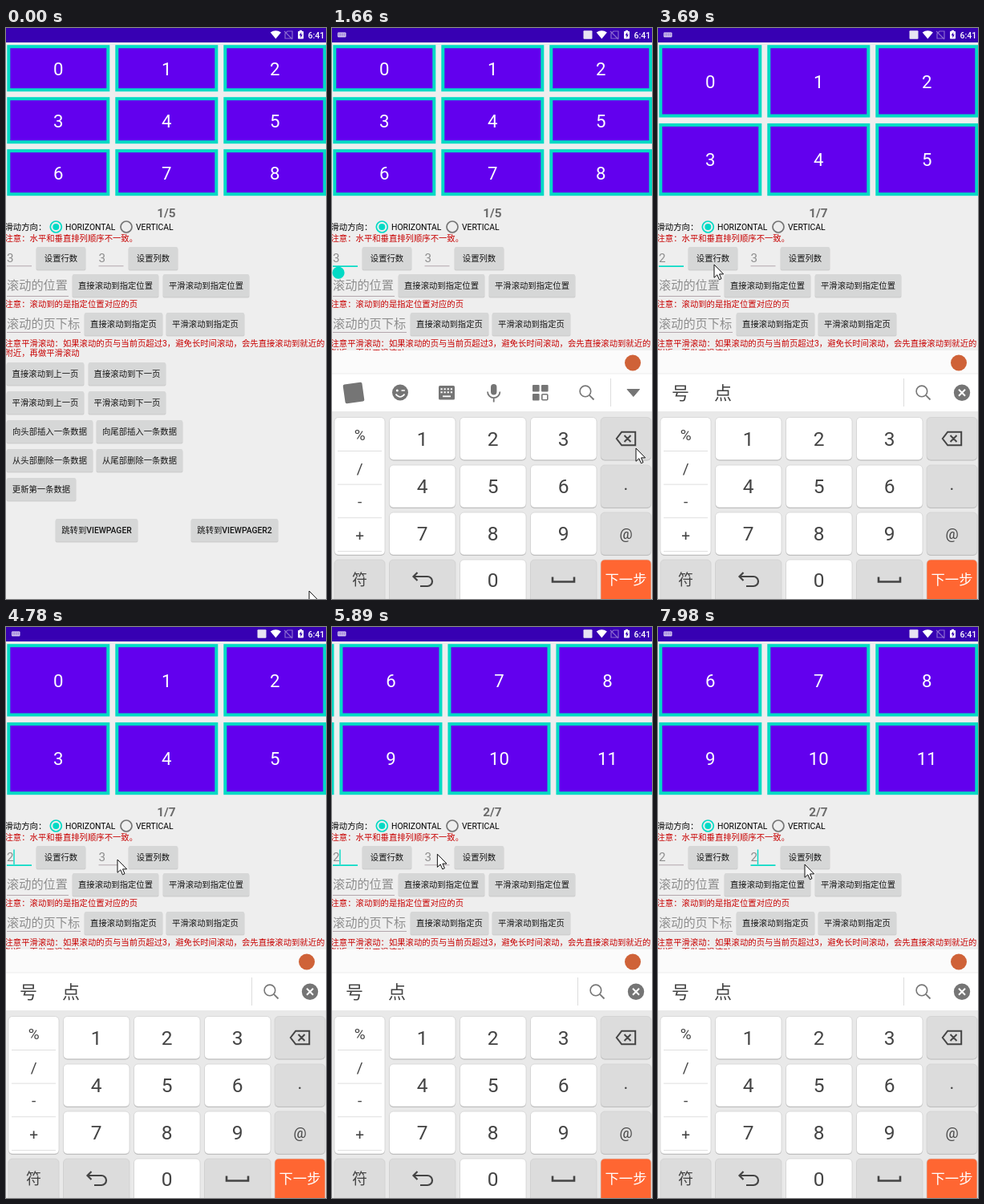
An HTML page that plays this animation: 399 by 712 pixels, repeating every 8000 ms.

```html
<!DOCTYPE html>
<html lang="zh-CN">
<head>
<meta charset="utf-8">
<title>Pager grid demo</title>
<style>
html, body { margin: 0; width: 100%; height: 100%; overflow: hidden; background: #eee; }
svg { display: block; width: 399px; height: 712px; }
text { font-family: Roboto, "Noto Sans CJK SC", "Noto Sans CJK", sans-serif; white-space: pre; }
</style>
</head>
<body>
<svg id="stage" viewBox="0 0 399 712" xmlns="http://www.w3.org/2000/svg"></svg>
<script>
const LOOP = 8000, TEAL = '#03dac5', GREY = '#757575', RED = '#c80000', HINT = '#8e8e8e';

// ---- markup helpers ----
const text = (s, x, y, size, fill = '#000', extra = '') =>
  `<text x="${x}" y="${y}" font-size="${size}" fill="${fill}" ${extra}>${s}</text>`;
const mid = (s, x, y, size, fill, extra = '') =>
  text(s, x, y, size, fill, `text-anchor="middle" ${extra}`);
const rect = (x, y, w, h, fill, r = 0, extra = '') =>
  `<rect x="${x}" y="${y}" width="${w}" height="${h}" rx="${r}" fill="${fill}" ${extra}/>`;
const circle = (x, y, r, fill, extra = '') =>
  `<circle cx="${x}" cy="${y}" r="${r}" fill="${fill}" ${extra}/>`;
const path = (d, fill, extra = '') => `<path d="${d}" fill="${fill}" ${extra}/>`;
const line = (d, stroke, w, extra = '') =>
  path(d, 'none', `stroke="${stroke}" stroke-width="${w}" ${extra}`);
const group = (id, body, extra = '') => `<g id="${id}" ${extra}>${body}</g>`;

// ---- app page ----
const button = (s, x, y, w, id = '') =>
  rect(x - .5, y + 1, w + 1, 28.6, '#000', 2, 'opacity=".13"') +
  rect(x, y, w, 28, '#d6d7d7', 1.5, id && `id="${id}"`) +
  mid(s, x + w / 2, y + 17.7, 10.35, '#151515', 'font-weight="500"');

const buttons = [
  ['设置行数', 38, 273, 61, 'setRows'], ['设置列数', 153, 273, 61],
  ['直接滚动到指定位置', 83, 307, 107], ['平滑滚动到指定位置', 196, 307, 107],
  ['直接滚动到指定页', 98, 355, 97], ['平滑滚动到指定页', 200, 355, 97],
  ['直接滚动到上一页', 1, 417, 96], ['直接滚动到下一页', 103, 417, 96],
  ['平滑滚动到上一页', 1, 453, 96], ['平滑滚动到下一页', 103, 453, 96],
  ['向头部插入一条数据', 1, 489, 107], ['向尾部插入一条数据', 113, 489, 107],
  ['从头部删除一条数据', 1, 525, 107], ['从尾部删除一条数据', 113, 525, 107],
  ['更新第一条数据', 1, 561, 86],
  ['跳转到VIEWPAGER', 62, 612, 102], ['跳转到VIEWPAGER2', 231, 612, 108]
];

const tiles = (rows, count) => {
  const h = rows === 3 ? 58 : 90.3, pitch = rows === 3 ? 65 : 97.7, per = rows * 3;
  let out = '';
  for (let i = 0; i < count; i++) {
    const n = i % per, x = 1.3 + 135 * (n % 3) + 405 * Math.floor(i / per);
    const y = 21.2 + pitch * Math.floor(n / 3);
    out += rect(x + 2, y + 2, 124, h - 4, '#6200ee', 0, `stroke="${TEAL}" stroke-width="4"`) +
      mid(i, x + 64, y + h / 2 + 8.4, 22.2, '#fff');
  }
  return out;
};

const field = (id, x) =>
  group(id + 'Text', text('3', x, 292, 15.2, HINT)) +
  rect(x, 296.3, 31, 1, '#b3a6ad', 0, `id="${id}Line"`) +
  rect(x + 8.6, 277.5, 1.4, 18.5, TEAL, 0, `id="${id}Caret"`) +
  path(`M${x + 7} 296.5l5.3 3.3a7.6 7.6 0 1 1-10.6 0z`, TEAL, `id="${id}Handle"`);

const page =
  group('grid3', tiles(3, 9)) + group('grid2', tiles(2, 12)) +
  group('label', mid('', 200, 236.3, 15.4, '#6b6b6b', 'font-weight="700"')) +
  text('滑动方向：', -1.5, 252, 10.35) +
  circle(62.3, 248, 7, 'none', `stroke="${TEAL}" stroke-width="1.7"`) + circle(62.3, 248, 4, TEAL) +
  text('HORIZONTAL', 74, 252, 10.4) +
  circle(150, 248, 7, 'none', `stroke="${GREY}" stroke-width="1.7"`) +
  text('VERTICAL', 162, 252, 10.4) +
  text('注意：水平和垂直排列顺序不一致。', -1.5, 266, 10.35, RED) +
  text('注意：滚动到的是指定位置对应的页', -1.5, 348.3, 10.35, RED) +
  text('注意平滑滚动：如果滚动的页与当前页超过3，避免长时间滚动，会先直接滚动到就近的', -1.5, 397, 10.35, RED) +
  text('附近，再做平滑滚动', -1.5, 409.3, 10.35, RED) +
  text('滚动的位置', 1, 326, 15.2, HINT) + rect(1, 334, 77, 1, '#b3a6ad') +
  text('滚动的页下标', 1, 374.2, 15.2, HINT) + rect(1, 379, 92, 1, '#b3a6ad') +
  buttons.map(b => button(...b)).join('') +
  field('row', 1) + field('col', 115.5);

const statusBar = rect(0, 0, 399, 18, '#3700b3') +
  path('M336.3 13.5L329.7 5.6Q336.3 .8 342.9 5.6z', '#fff') +
  line('M348 13V7l3-3h6v9zM347 4l10 10', '#8b6bd0', 1.2) +
  rect(364, 4, 7, 9.6, '#fff', .8) + rect(366, 2.8, 3, 2, '#fff') +
  path('M368.2 5.2l-2.6 4h1.7v3.2l2.5-4.2h-1.6z', '#3700b3') +
  text('6:41', 376.6, 12.8, 10.5, '#fff', 'font-weight="500"') +
  group('imeIcons',
    rect(7, 5.4, 10.5, 6.2, '#d9cdf2', 1) +
    line('M8 7.4h8.5M8 9.2h8.5', '#3700b3', .8, 'stroke-dasharray="1 .8"') +
    rect(313.5, 3.2, 11, 10.6, '#e8e4f2', 1));

// ---- keyboard ----
const key = (x, y, w, h, fill, id = '') =>
  rect(x, y + 1, w, h, '#b5b5b5', 5) +
  rect(x, y, w, h, fill, 5, `stroke="#cfcfcf" stroke-width=".7" ${id && `id="${id}"`}`);
const INK = '#444', MUTE = '#dcdcdc';
const rowsY = [485.5, 545, 604], colsX = [71.5, 159.5, 247.5];
const search = (x, y) => circle(x - 1.6, y - 1.6, 6.8, 'none', 'stroke="#777" stroke-width="1.6"') +
  line(`M${x + 3.4} ${y + 3.4}l5.6 5.6`, '#777', 1.8);

const toolbar =
  rect(15, 443, 24, 24, GREY, 2, 'transform="rotate(-8 27 455)"') +
  circle(85, 454.5, 10, GREY) + circle(81.3, 452, 1.5, '#fff') +
  line('M86.5 452h4.4M79.5 456.5q5.5 7 11 0', '#fff', 1.7) +
  rect(133, 446, 20, 17.5, GREY, 1.5) +
  line('M135.5 450.2h15M135.5 454.3h15', '#fff', 2, 'stroke-dasharray="2.2 1.9"') +
  line('M138 459.3h10', '#fff', 1.8) +
  rect(198, 444, 7.4, 13.5, GREY, 3.7) +
  line('M194 453.5a7.7 7.7 0 0 0 15.4 0M201.7 461.5v5', GREY, 1.8) +
  rect(250, 445, 8.6, 8.6, GREY, 1) + rect(250, 456, 8.6, 8.6, GREY, 1) + rect(261, 445, 8.6, 8.6, GREY, 1) +
  rect(261.8, 456.8, 7, 7, 'none', 1, `stroke="${GREY}" stroke-width="1.6"`) +
  search(317.5, 454.5) + rect(347, 437, 1, 35, '#ddd') +
  path('M368 450.5h15.5l-7.7 9z', GREY, `stroke="${GREY}" stroke-linejoin="round"`);

const candidates = text('号', 17, 463, 22, INK) + text('点', 70, 463, 22, INK) +
  rect(306, 437, 1, 35, '#ddd') + search(330.5, 454.5) + circle(379, 454.7, 10.2, GREY) +
  line('M375 450.7l8 8m0-8l-8 8', '#fff', 2);

let keyboard = rect(0, 402, 399, 310, '#e9e9e9') + rect(0, 402, 399, 29, '#fbfbfb') +
  rect(0, 431, 399, 47, '#fff') + rect(0, 430.6, 399, .8, '#e9e9e9') +
  circle(375, 417.5, 10, '#cf6238') + group('tools', toolbar) + group('cands', candidates) +
  key(3, 485.5, 63, 171.5, '#fff');
['%', '/', '-', '+'].forEach((s, i) => {
  keyboard += mid(s, 34.7, 514 + 41.5 * i, 19, INK) + rect(7, 527 + 41.7 * i, 55, .8, '#d8d8d8');
});
rowsY.forEach((y, r) => colsX.forEach((x, c) => {
  const n = r * 3 + c + 1;
  keyboard += key(x, y, 82.5, 53, '#fff', 'key' + n) + mid(n, x + 41.2, y + 35.4, 24.5, INK);
}));
rowsY.forEach((y, i) => { keyboard += key(335, y, 63, 53, MUTE, 'side' + i); });
keyboard +=
  line('M354.8 512l6.4-8.3h17v16.6h-17zM364.5 508l8 8m0-8l-8 8', INK, 2) +
  mid('.', 366.5, 576, 22, INK) + mid('@', 366.5, 637, 18, INK) +
  key(3, 663, 63, 55, MUTE) + mid('符', 34.5, 694.5, 19, INK) +
  key(71.5, 663, 82.5, 55, MUTE) + line('M106.5 679l-5 5 5 5M102 684h17a6 6 0 0 1 0 12h-9', INK, 2.2) +
  key(159.5, 663, 82.5, 55, '#fff') + mid('0', 200.7, 696.7, 24.5, INK) +
  key(247.5, 663, 82.5, 55, MUTE) + line('M275 684.5v6h27v-6', INK, 2.6) +
  key(335, 663, 63, 55, '#ff6632') + mid('下一步', 366.5, 694, 17.3, '#fff');

const arrow = path('M0 0V16.3L3.8 12.8 6.4 18.8 9 17.6 6.5 11.9H11.6z', '#fff',
  'id="cursor" stroke="#111" stroke-width="1" stroke-linejoin="round"');

stage.innerHTML = rect(0, 0, 399, 712, '#eee') + page + group('ime', keyboard) + statusBar + arrow;

// ---- motion: [time, value...] steps, eased between ----
const cursorSteps = [
  [0, 378, 702], [40, 378, 702], [480, 120, 360], [700, 14, 268], [810, 9, 284], [1180, 9, 284],
  [1500, 340, 480], [1660, 379, 524], [1950, 379, 524], [2420, 196, 514], [2510, 194, 516], [2880, 194, 516],
  [3250, 72, 294], [3320, 70, 295], [4130, 70, 295], [4500, 128, 288], [4780, 139, 290], [4950, 139, 290],
  [5220, 285, 160], [5250, 285, 160], [5450, 125, 165], [5480, 125, 167], [5640, 156, 260], [5760, 142, 280],
  [6010, 122, 286], [6300, 122, 286], [6640, 340, 460], [6820, 358, 500], [7060, 358, 502],
  [7320, 196, 516], [7600, 196, 518], [7900, 188, 306], [7980, 183, 296], [8000, 183, 296]
];
const scrollSteps = [[0, 0], [5250, 0], [5460, 160], [5640, 307], [5760, 368], [5860, 394], [5980, 405], [8000, 405]];
const imeSteps = [[0, 310], [1020, 310], [1120, 70], [1200, 0], [8000, 0]];

function sample(steps, t, ease = k => k) {
  let i = 1;
  while (i < steps.length - 1 && steps[i][0] <= t) i++;
  const a = steps[i - 1], b = steps[i];
  const k = ease(Math.min(1, Math.max(0, (t - a[0]) / (b[0] - a[0]))));
  return a.slice(1).map((v, n) => v + (b[n + 1] - v) * k);
}
const soft = k => .4 * k + .6 * k * k * (3 - 2 * k);

const el = id => document.getElementById(id);
const show = (id, on) => el(id).style.display = on ? '' : 'none';
const within = (t, a, b) => t >= a && t < b;
const blink = (t, from) => (t - from) % 1000 < 500;

function setField(id, x, value, hint, focus, caret, handle) {
  const node = el(id + 'Text').firstChild, label = value || hint;
  if (node.textContent !== label) node.textContent = label;
  const bar = el(id + 'Line');
  bar.setAttribute('fill', focus ? TEAL : '#b3a6ad');
  bar.setAttribute('height', focus ? 1.7 : 1);
  el(id + 'Caret').setAttribute('x', x + (value ? 8.3 : 0));
  show(id + 'Caret', focus && caret);
  show(id + 'Handle', handle);
}

function render(t) {
  const two = t >= 3480, first = within(t, 900, 6200), second = t >= 6200;
  show('grid3', !two);
  show('grid2', two);
  el('grid2').setAttribute('transform', `translate(${-sample(scrollSteps, t)[0]} 0)`);
  el('label').firstChild.textContent = !two ? '1/5' : t < 5860 ? '1/7' : '2/7';

  const rowStart = t < 1760 ? 900 : t < 2820 ? 1760 : 2700;
  setField('row', 1, t < 1760 ? '3' : t < 2820 ? '' : '2', '行数',
    first, blink(t, rowStart), within(t, 930, 1760));
  const colStart = t < 7030 ? 6250 : t < 7570 ? 7030 : 7570;
  setField('col', 115.5, t < 7030 ? '3' : t < 7570 ? '' : '2', '列数',
    second, blink(t, colStart), within(t, 6230, 7030));

  const imeY = sample(imeSteps, t)[0];
  show('ime', imeY < 310);
  el('ime').setAttribute('transform', `translate(0 ${imeY})`);
  show('imeIcons', t >= 1050);
  const cands = within(t, 2820, 7030) || t >= 7570;
  show('cands', cands);
  show('tools', !cands);

  el('side0').setAttribute('fill', within(t, 1700, 1820) || within(t, 6990, 7080) ? '#c4c4c4' : MUTE);
  el('key2').setAttribute('fill', within(t, 2790, 2880) || within(t, 7530, 7620) ? '#dcdcdc' : '#fff');
  el('setRows').setAttribute('fill', within(t, 3360, 3520) ? '#c3c4c4' : '#d6d7d7');
  el('cursor').setAttribute('transform', `translate(${sample(cursorSteps, t, soft)})`);
}

const start = performance.now();
function tick() {
  render((performance.now() - start) % LOOP);
  requestAnimationFrame(tick);
}
tick();
</script>
</body>
</html>
```
